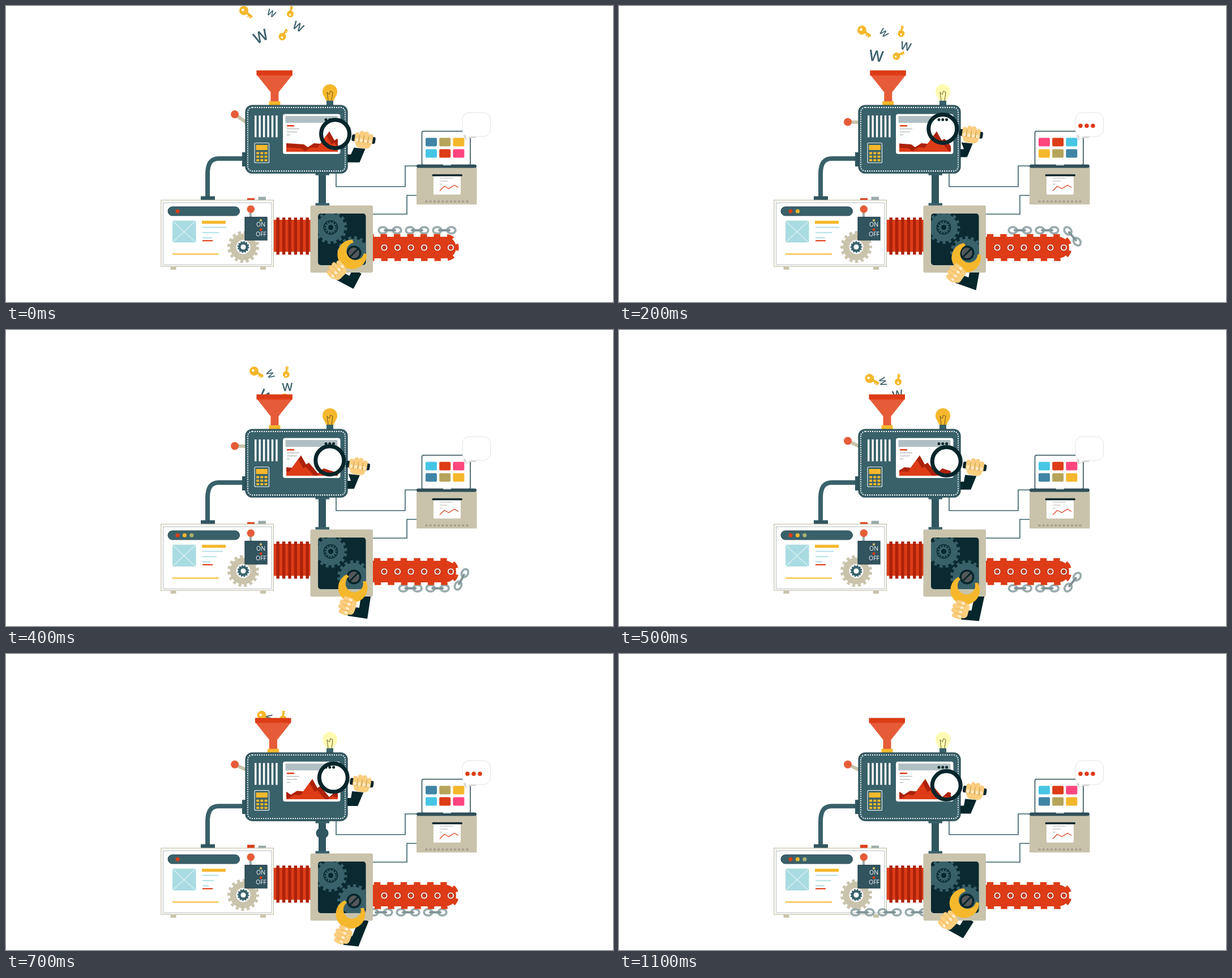
Animation, 1072 px wide and 522 px high, one loop 1200 ms. Source, as an HTML page with a canvas:

```html
<!DOCTYPE html>
<html lang="en">
<head>
<meta charset="utf-8">
<title>Content machine</title>
<style>
  html, body { margin: 0; width: 100%; height: 100%; overflow: hidden; background: #fff; }
  canvas { display: block; }
</style>
</head>
<body>
<canvas id="stage" width="1072" height="522"></canvas>
<script>
const ctx = document.getElementById('stage').getContext('2d');
const TEAL = '#39616a', STEEL = '#305660', DARK = '#05262b', RED = '#dd3c17', CORAL = '#e65c38',
  BRICK = '#ad220a', YELLOW = '#f5b82c', SAND = '#c9c3ac', GRAY = '#9aabad', CYAN = '#46c6e4',
  AQUA = '#a9dce2', BLUE = '#3f85a5', OLIVE = '#b5a55a', PINK = '#ff467e', SKIN = '#fbcf7f';
const STEP = 100, STEPS = 12;
let step = 0;

// Swings around the mean and is highest at step `peak`.
const wave = (mean, swing, peak, period = STEPS) =>
  mean + swing * Math.cos(2 * Math.PI * (step - peak) / period);
const blinking = () => step % 4 > 1;
const third = () => Math.floor(step / 2) % 3;

function paint(fill, stroke, width = 1) {
  if (fill) { ctx.fillStyle = fill; ctx.fill(); }
  if (stroke) { ctx.strokeStyle = stroke; ctx.lineWidth = width; ctx.stroke(); }
}
function box(x, y, w, h, fill, r = 0, stroke, width) {
  ctx.beginPath();
  ctx.roundRect(x, y, w, h, r);
  paint(fill, stroke, width);
}
function oval(x, y, rx, ry, fill, stroke, width) {
  ctx.beginPath();
  ctx.ellipse(x, y, rx, ry, 0, 0, 2 * Math.PI);
  paint(fill, stroke, width);
}
const disc = (x, y, r, ...style) => oval(x, y, r, r, ...style);
function trace(points) {
  ctx.beginPath();
  points.forEach(([x, y]) => ctx.lineTo(x, y));
}
function shape(points, fill) { trace(points); paint(fill); }
function line(points, color, width) { trace(points); paint(null, color, width); }
function repeat(count, draw) {
  for (let i = 0; i < count; i++) draw(i);
}

function placed(x, y, angle, draw) {
  ctx.save();
  ctx.translate(x, y);
  ctx.rotate(angle);
  draw();
  ctx.restore();
}
function clipped(x, y, w, h, draw) {
  ctx.save();
  ctx.beginPath();
  ctx.rect(x, y, w, h);
  ctx.clip();
  draw();
  ctx.restore();
}
function dashed(pattern, offset, draw) {
  ctx.setLineDash(pattern);
  ctx.lineDashOffset = offset;
  draw();
  ctx.setLineDash([]);
}
function label(text, x, y, size, color, weight = 400) {
  ctx.font = `${weight} ${size}px "Open Sans", sans-serif`;
  ctx.textAlign = 'center';
  ctx.textBaseline = 'middle';
  ctx.fillStyle = color;
  ctx.fillText(text, x, y);
}
function gear(x, y, r, teeth, depth, color) {
  const half = Math.PI * (r - depth / 2) / teeth;
  disc(x, y, r - depth + .5, color);
  dashed([half, half], half * step / 3, () => disc(x, y, r - depth / 2, null, color, depth));
}

function key(r) {
  box(r - 2, -r * .26, r * 1.35 + 2, r * .52, YELLOW, 1);
  box(r * 1.4, 0, r * .28, r * .6, YELLOW);
  box(r * 1.9, 0, r * .28, r * .6, YELLOW);
  disc(0, 0, r, YELLOW);
  disc(-r * .25, 0, r * .28, '#fff');
}
const letter = size => label('W', 0, 0, size, '#3b5f6b', 600);

function fallingThings() {
  const drop = (draw, size, x, y, degrees, drift, spin) => placed(
    x + drift * step,
    y + 18.5 * step - .6 * step ** 2,
    (degrees + spin * step) * Math.PI / 180,
    () => draw(size));
  clipped(390, 0, 160, 114, () => {
    drop(key, 8, 420, 8, 38, 4.5, -2);
    drop(letter, 16, 468, 14, 28, -.7, 9);
    drop(key, 6, 502, 14, -82, -1.8, -1);
    drop(letter, 27, 451, 56, -25, 1.5, 16);
    drop(letter, 20, 515, 38, 30, -4.5, -8);
    drop(key, 6.5, 488, 54, -60, 1, 15);
  });
}

function funnel() {
  placed(wave(-1.5, 1.8, 2), 0, 0, () => {
    shape([[444, 122], [506, 122], [482, 152], [482, 169], [468, 169], [468, 152]], CORAL);
    box(443, 113.5, 63.5, 9, RED);
    box(465, 168, 20, 7, YELLOW);
  });
}
function bulb() {
  const glass = blinking() ? '#fffbb2' : YELLOW;
  disc(572, 151, 13, glass);
  shape([[560, 156], [584, 156], [578, 168], [566, 168]], glass);
  line([[569, 167], [567, 152], [571, 156], [573, 150], [577, 152], [575, 167]], '#5c4a20', .9);
  box(566, 167, 12, 8, TEAL);
}
function lever() {
  const y = wave(200, -9, 0, 6);
  line([[404, y], [424, 205]], SAND, 6);
  disc(404, y, 7, CORAL);
}
function chart() {
  const peak = step < 4 ? 571 - 5 * step : Math.min(541, 481 + 10 * step);
  const ridge = [[-75, 15], [-45, 13], [-38, 8], [-27, 15], [-16, 14], [0, 36], [9, 20], [14, 23],
    [30, 4], [40, 13], [65, 5]];
  const range = (dx, dy, color) => shape(
    [[440, 257], ...ridge.map(([x, height]) => [peak + x + dx, 257 + dy - height]), [640, 257]], color);
  clipped(495, 207, 91, 50, () => {
    range(0, 0, BRICK);
    range(-5, 7, RED);
  });
}

const lens = () => ({ x: wave(575, 6.5, 0, 6), y: wave(224, -8, 1.7, 6) });

function monitor() {
  box(489, 190.5, 101.5, 70.5, '#fff', 4);
  box(493.5, 194, 92, 12, '#b0bfc3');
  const { x, y } = lens();
  disc(x, y, 24, '#fff');
  repeat(3, i => disc(565 + 6.8 * i, 200.5, 2.5, DARK));
  box(496, 210, 13, 2.5, RED);
  repeat(3, i => box(496, 216 + 5.4 * i, 22 - 4 * i * i, 1.2, '#a8b0b2'));
  chart();
}
function calculator() {
  box(439, 241.5, 25.5, 35, TEAL, 2, '#e8efee', 1.2);
  box(441.5, 245, 20.5, 9, YELLOW);
  repeat(9, i => box(442 + i % 3 * 7.2, 257.5 + Math.floor(i / 3) * 6.3, 5.2, 4, YELLOW, 1));
}
function machine() {
  funnel();
  bulb();
  lever();
  ctx.beginPath();
  ctx.moveTo(418, 269);
  ctx.lineTo(376, 269);
  ctx.bezierCurveTo(362, 269, 356, 278, 356, 296);
  ctx.lineTo(356, 337);
  paint(null, TEAL, 8);
  box(417, 258, 7, 25, STEEL);
  box(423, 175, 180, 120, TEAL, 12, '#27464f', 1.2);
  dashed([2, 2], 0, () => box(427, 179, 172, 112, null, 8, '#fff', 1.8));
  repeat(6, i => box(439 + 7.45 * i, 193, 3.4, 38.5, '#fff'));
  calculator();
  monitor();
}

// A fist closed around a handle that lies along the local x axis.
function fist(x, y, angle, handle) {
  placed(x, y, angle, () => {
    box(-13, 0, 27, 16, SKIN, 7);
    handle();
    repeat(4, i => {
      const top = -10 - 4 * Math.sin(Math.PI * i / 3);
      box(-15.5 + 8 * i, top, 7.4, 8 - top, SKIN, 3.7, '#efb765', .6);
      box(-14 + 8 * i, 0, 4.6, 6, '#ffebc6', 2);
    });
  });
}
function magnifier() {
  const { x, y } = lens(), base = y + 50;
  shape([[603, base - 14], [609, base - 14], [x + 33, y + 24], [x + 53, y + 26],
    [x + 43, base], [603, base]], DARK);
  disc(x, y, 25, null, DARK, 7);
  fist(x + 50, y + 9, .14, () => box(-21, -6, 42, 12, DARK, 3));
}

function pipeDown() {
  box(552, 294, 13, 56, STEEL);
  if (step >= 6 && step < 10)
    clipped(540, 297, 40, 52, () => oval(558.5, 301 + 15 * (step - 6), 11, 10, STEEL));
  box(546.5, 294, 24.5, 4.5, TEAL);
  box(546.5, 347.5, 24.5, 5, TEAL);
}
function wires() {
  line([[583, 295], [583, 318.5], [705, 318.5], [705, 282], [727, 282]], TEAL, 1.6);
  line([[647, 367], [708, 367], [708, 334], [727, 334]], TEAL, 1.6);
}

function laptop() {
  const colors = [BLUE, OLIVE, YELLOW, CYAN, RED, PINK];
  const order = [i => i, i => 5 - i, i => (i + 3) % 6][third()];
  box(734.5, 220.8, 85.5, 60, '#fff', 3, '#2f4f59', 1.6);
  repeat(6, i => box(741 + i % 3 * 24.2, i < 3 ? 232.5 : 252.5, 20, 15, colors[order(i)], 2));
  box(725, 285, 106.5, 65, SAND, 1);
  box(725, 279.5, 106, 6, '#2f4f59', 3);
  box(772, 279.5, 14, 1.4, '#fff');
  box(755, 299, 48, 33.5, '#fff', 2);
  box(752.5, 296.7, 53.5, 3.6, DARK, 2);
  repeat(3, i => box(766, 303 + 5.3 * i, 23 - 9 * i, 1, '#b5b5b0'));
  line([[766, 326], [774, 318], [782, 322], [792, 316], [799, 320]], RED, 1.2);
  repeat(11, i => box(740.5 + 7.2 * i, 343, 4, 3.5, '#a5a08a'));
}
function bubble() {
  shape([[807, 228], [833, 228], [829, 233], [818, 233], [812, 237], [810, 233]], '#d9d9d6');
  box(806, 188, 49.5, 42, '#fff', 12, '#e2e2e2', 1);
  shape([[813, 228], [821, 228], [813, 236]], '#fff');
  if (blinking()) repeat(3, i => disc(815 + 11 * i, 211.3, 3.8, RED));
}

function pageContent() {
  box(286, 354, 126.5, 15.8, TEAL, 8, '#294953', 1);
  [RED, YELLOW, '#a9b173'].slice(0, 1 + third())
    .forEach((color, i) => disc(303 + 12.4 * i, 362, 3.6, color));
  box(294, 378.5, 41.5, 38.5, AQUA);
  line([[294, 379], [335, 417]], '#fff', 1);
  line([[294, 417], [335, 379]], '#fff', 1);
  box(346, 378.8, 42, 5.2, YELLOW);
  repeat(3, i => box(347, 389.5 + 9.2 * i, wave(36 - 11 * i, 7 - 2 * i, 1), 1.8, AQUA));
  box(347, 413, 18, 2, RED);
  box(294, 436.5, 82, 2, YELLOW);
}
function switchBox() {
  box(430, 363, 4, 10, GRAY);
  disc(432.3, 358.3, 6.7, CORAL);
  box(422, 372.3, 39, 40.5, '#31545f', 0, '#203f49', 1.2);
  disc(450, 378, 2.2, '#c5b66a');
  disc(450, 394.5, 2.4, RED);
  label('ON', 450, 386.5, 10.5, '#fff');
  label('OFF', 450.5, 403, 10.5, '#fff');
}
function panel() {
  const late = step >= 7;
  box(426, late ? 336.5 : 339, 13, 6, RED);
  box(445.5, late ? 338 : 336.5, 13.5, 6, GRAY);
  box(344, 335.5, 25, 7, STEEL);
  box(290.5, 460, 10, 5, SAND);
  box(449, 460, 10, 5, SAND);
  box(273.8, 342.3, 198.5, 117, '#fff', 0, SAND, 1.3);
  dashed([1.2, 1.2], 0, () => box(277.5, 347, 191.5, 109.5, null, 0, '#6c7778', 1));
  pageContent();
  gear(419, 425, 28, 16, 5, SAND);
  disc(419, 425, 12.5, '#fff');
  gear(419, 425, 10.5, 12, 2, TEAL);
  disc(419, 425, 4.6, '#fff');
  switchBox();
}

function bellows() {
  box(472.5, 377, 66, 56.5, RED);
  repeat(6, i => box(477.5 + 10.4 * i, 373, 5.4, 65.5, BRICK));
}

// The chain runs right along the top, around the end and back below.
function chainLink(distance) {
  const top = 138, radius = 30, bottom = top + Math.PI * radius;
  const turn = Math.max(0, Math.min(Math.PI, (distance - top) / radius));
  const run = Math.min(0, distance - top) || Math.min(0, bottom - distance);
  placed(778 + run + radius * Math.sin(turn), 425.5 - radius * Math.cos(turn), turn, () => {
    for (const x of [-12.5, 12.5]) oval(x, 0, 7.4, 5.6, null, GRAY, 3.8);
    box(-11, -2, 22, 4, '#7f9295', 2);
  });
}
function conveyor() {
  const pitch = 23.5, shift = step % 3 ? pitch / 2 : 0;
  const belt = r => {
    ctx.beginPath();
    ctx.moveTo(646, 426 - r);
    ctx.lineTo(776, 426 - r);
    ctx.arc(776, 426, r, -Math.PI / 2, Math.PI / 2);
    ctx.lineTo(646, 426 + r);
  };
  const tail = step < 4 ? 38 + 15 * step : 200 + 5.8 * (step - 4) ** 2;
  repeat(3, i => chainLink(tail + 48 * i));
  dashed([11.5, 12], 8 - shift, () => { belt(21); paint(null, RED, 5.5); });
  belt(19);
  paint(RED);
  repeat(6, i => {
    const x = 668 + pitch * i;
    disc(x, 426, 6, '#fff', BRICK, .8);
    disc(x, 426, 3.4, RED, '#7c2a1a', .8);
  });
}

function gearbox() {
  box(537.5, 351.8, 110.5, 118.5, SAND, 3);
  box(551, 366, 84.5, 91, '#0a2931', 5);
  clipped(551, 366, 84.5, 91, () => {
    gear(573.5, 390.5, 29, 16, 5, TEAL);
    disc(573.5, 390.5, 12, null, DARK, 1.6);
    dashed([2.5, 2.5], 0, () => disc(573.5, 390.5, 9.5, null, DARK, 2.5));
    disc(573.5, 390.5, 4.5, DARK);
    gear(614, 435, 29, 16, 5, TEAL);
  });
  disc(614.5, 435.5, 13, DARK);
  disc(614.5, 435.5, 9.5, '#55585a');
  line([[607, 443], [622, 428]], DARK, 3);
}
function wrench() {
  const head = [wave(610.5, 3, 2.5), wave(449, 11, 6)];
  const hand = [wave(591, 11, 4.5), wave(481, 15.5, 6.3)];
  const elbow = [wave(617, 14, 4), wave(497, 10, 6.5)];
  const shoulder = [wave(628, 9, 5), 468];
  clipped(550, 470, 110, 52, () =>
    line([[hand[0] + 3, hand[1] + 9], elbow, shoulder], DARK, 17));

  const dx = head[0] - hand[0], dy = head[1] - hand[1], angle = Math.atan2(dy, dx);
  placed(...head, angle, () => {
    ctx.beginPath();
    ctx.arc(0, 0, 26, .78, -.78);
    ctx.arc(8, 0, 15.5, -1, 1, true);
    paint(YELLOW);
  });
  fist(...hand, angle, () => box(-16, -6.5, Math.hypot(dx, dy), 13, YELLOW, 4));
}

function draw() {
  ctx.fillStyle = '#fff';
  ctx.fillRect(0, 0, 1072, 522);
  fallingThings();
  wires();
  pipeDown();
  placed(0, step >= 7 ? -.8 : 0, 0, machine);
  magnifier();
  laptop();
  bubble();
  bellows();
  panel();
  conveyor();
  gearbox();
  wrench();
}
function tick() {
  step = Math.floor(performance.now() / STEP) % STEPS;
  draw();
  requestAnimationFrame(tick);
}
tick();
</script>
</body>
</html>
```
